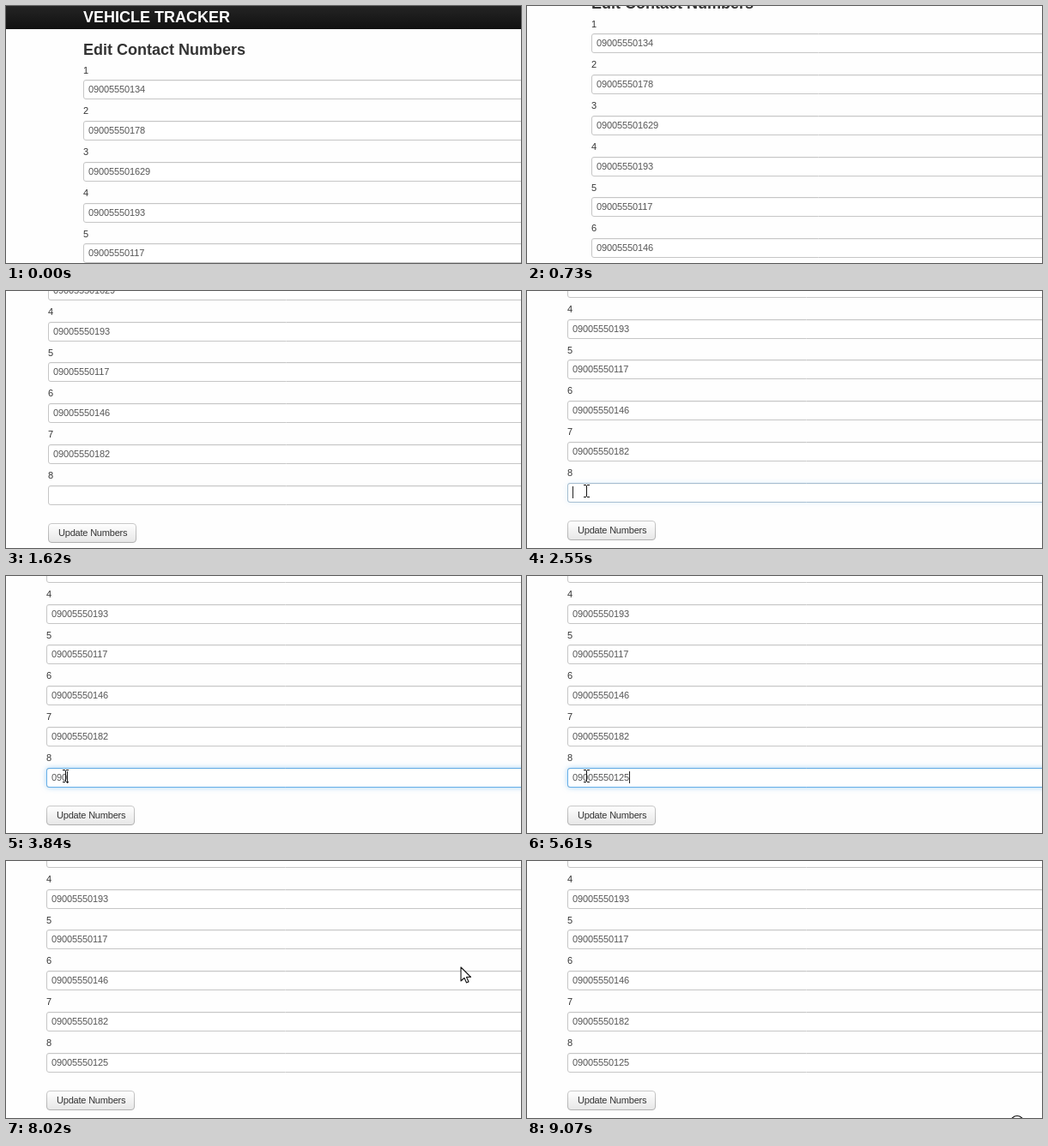
Write an HTML page with a canvas that moves like this. It is 600 by 300 pixels and loops after 9130 ms.

```html
<!DOCTYPE html>
<html lang="en">
<head>
<meta charset="utf-8">
<title>Edit Contact Numbers</title>
<style>
  html, body { margin: 0; width: 100%; height: 100%; overflow: hidden; background: #fefefe; }
  canvas { display: block; }
</style>
</head>
<body>
<canvas id="stage" width="600" height="300"></canvas>
<script>
const ctx = document.getElementById('stage').getContext('2d');
const LOOP = 9130;
const FACE = '"Liberation Sans", Arial, sans-serif';
const SMALL = '11px ' + FACE;
const BOLD = 'bold 18px ' + FACE;

const LEFT = 90;
const numbers = ['09005550134', '09005550178', '090055501629', '09005550193',
                 '09005550117', '09005550146', '09005550182', '09005550125'];
const keyTimes = [3250, 3470, 3840, 3960, 4330, 4450, 4600, 4940, 5120, 5490, 5610];

// time, x, y
const camera = [[454, 0, 0], [730, 15, 54], [1210, 21, 154], [1370, 23, 172],
                [1380, 23, 172], [1620, 41, 194], [1700, 43, 197]];
const pointer = [[1960, 604, 24], [2400, 70, 233], [6310, 70, 233], [6710, 137, 274],
                 [7480, 137, 274], [7860, 530, 124], [8140, 530, 124], [9070, 571, 297]];

const FOCUS = 2460, PRESS = 6950, RELEASE = 7050;

const clamp = v => Math.max(0, Math.min(1, v));
const smooth = v => v * v * (3 - 2 * v);
const snap = (t, from, step) => from + Math.floor((t - from) / step) * step;

function along(keys, t, ease = v => v) {
  const i = keys.findIndex(k => k[0] > t);
  if (i === 0) return keys[0].slice(1);
  if (i < 0) return keys[keys.length - 1].slice(1);
  const [t0, x0, y0] = keys[i - 1], [t1, x1, y1] = keys[i];
  const p = ease((t - t0) / (t1 - t0));
  return [x0 + (x1 - x0) * p, y0 + (y1 - y0) * p];
}

function view(t) {
  if (t < 500) return [0, 0];
  const s = t < 730 ? snap(t, 500, 46)
    : t < 1420 ? Math.min(1370, snap(t, 730, 40))
    : snap(t, 1420, 40);
  return along(camera, s).map(Math.round);
}

function text(str, x, y, font, color, spacing = 0) {
  ctx.font = font;
  ctx.fillStyle = color;
  ctx.letterSpacing = spacing + 'px';
  ctx.fillText(str, x, y);
  ctx.letterSpacing = '0px';
}

function digits(str, x, y) {
  ctx.font = SMALL;
  text(str, x, y, SMALL, '#555', 6 - ctx.measureText('0').width);
}

function box(x, y, w, h, r) {
  ctx.beginPath();
  ctx.roundRect(x + 0.5, y + 0.5, w - 1, h - 1, r);
}

function fade(y, h, top, bottom) {
  const g = ctx.createLinearGradient(0, y, 0, y + h);
  g.addColorStop(0, top);
  g.addColorStop(1, bottom);
  return g;
}

function field(y, value, glow) {
  const w = 700;
  if (glow > 0) {
    ctx.save();
    ctx.shadowColor = `rgba(82,168,236,${0.6 * glow})`;
    ctx.shadowBlur = 6;
    ctx.fillStyle = '#fff';
    box(LEFT, y, w, 23, 2.5);
    ctx.fill();
    ctx.restore();
  }
  box(LEFT, y, w, 23, 2.5);
  ctx.fillStyle = '#fff';
  ctx.fill();
  ctx.fillStyle = 'rgba(0,0,0,.04)';
  ctx.fillRect(LEFT + 2, y + 1, w, 1);
  box(LEFT, y, w, 23, 2.5);
  ctx.lineWidth = 1;
  ctx.strokeStyle = '#c6c6c6';
  ctx.stroke();
  if (glow > 0) {
    ctx.strokeStyle = `rgba(92,172,236,${0.9 * glow})`;
    ctx.stroke();
  }
  digits(value, LEFT + 6, y + 15);
}

function button(hover, pressed) {
  const y = 465;
  box(LEFT, y, 103, 23, 3.5);
  ctx.fillStyle = pressed ? '#dcdcdc' : hover ? fade(y, 23, '#e9e9e9', '#e2e2e2') : fade(y, 23, '#fff', '#e6e6e6');
  ctx.fill();
  ctx.lineWidth = 1;
  ctx.strokeStyle = fade(y, 23, '#c9c9c9', '#b0b0b0');
  ctx.stroke();
  text('Update Numbers', LEFT + 12, 480, SMALL, '#333', -0.2);
}

function page(t, hover) {
  ctx.fillStyle = fade(0, 27, '#242424', '#111');
  ctx.fillRect(0, 0, 700, 27);
  text('VEHICLE TRACKER', LEFT, 19, BOLD, '#fff');
  text('Edit Contact Numbers', LEFT, 57, BOLD, '#333');

  const typed = keyTimes.filter(k => k <= t).length;
  const glow = t < PRESS ? clamp((t - FOCUS) / 270) : 1 - clamp((t - PRESS) / 240);
  numbers.forEach((number, i) => {
    const last = i === numbers.length - 1;
    const y = Math.floor(86.9 + 47.75 * i);
    text(String(i + 1), LEFT, Math.floor(79.2 + 47.75 * i), SMALL, '#333');
    field(y, last ? number.slice(0, typed) : number, last ? glow : 0);
    if (last && t >= FOCUS && t < 6100) {
      ctx.fillStyle = '#222';
      ctx.fillRect(LEFT + 6 + typed * 6, y + 4, 1, 14);
    }
  });
  button(hover, t >= PRESS && t < RELEASE);
}

function shape(points, x, y) {
  ctx.beginPath();
  points.forEach(([px, py]) => ctx.lineTo(x + px, y + py));
  ctx.closePath();
  ctx.fillStyle = '#fff';
  ctx.fill();
  ctx.lineWidth = 1.1;
  ctx.lineJoin = 'round';
  ctx.strokeStyle = '#111';
  ctx.stroke();
}

function arrow(x, y) {
  shape([[0, 0], [0, 16], [4, 12.5], [6.5, 18], [9, 17], [6.5, 11.5], [11.5, 11.5]], x, y);
}

function beam(x, y) {
  ctx.fillStyle = '#111';
  ctx.fillRect(x - 1, y - 6, 1, 13);
  for (const end of [-7, 7]) {
    ctx.fillRect(x - 4, y + end, 3, 1);
    ctx.fillRect(x, y + end, 3, 1);
  }
}

function hand(x, y) {
  ctx.beginPath();
  ctx.moveTo(x - 3, y + 12);
  ctx.lineTo(x - 3, y + 1.5);
  ctx.quadraticCurveTo(x - 1, y - 1.5, x + 1, y + 1.5);
  ctx.lineTo(x + 1, y + 7);
  ctx.quadraticCurveTo(x + 4, y + 5.5, x + 4.5, y + 8);
  ctx.quadraticCurveTo(x + 7.5, y + 6.5, x + 8, y + 9);
  ctx.quadraticCurveTo(x + 11, y + 8.5, x + 11, y + 11);
  ctx.quadraticCurveTo(x + 11, y + 17, x + 8.5, y + 19);
  ctx.lineTo(x + 8.5, y + 23);
  ctx.lineTo(x - 1, y + 23);
  ctx.lineTo(x - 1, y + 20);
  ctx.quadraticCurveTo(x - 4, y + 17, x - 7, y + 12);
  ctx.quadraticCurveTo(x - 5.5, y + 9, x - 3, y + 12);
  ctx.closePath();
  ctx.fillStyle = '#fff';
  ctx.fill();
  ctx.lineWidth = 1.2;
  ctx.strokeStyle = '#111';
  ctx.stroke();
  ctx.beginPath();
  for (const [dx, dy] of [[1, 7], [4.5, 8], [8, 9]]) {
    ctx.moveTo(x + dx, y + dy);
    ctx.lineTo(x + dx, y + dy + 4);
  }
  ctx.stroke();
}

function ring(x, y) {
  ctx.beginPath();
  ctx.arc(x, y + 8, 7.5, 0, Math.PI * 2);
  ctx.lineWidth = 1.2;
  ctx.strokeStyle = '#111';
  ctx.stroke();
}

function draw(t) {
  const [cx, cy] = view(t);
  const [x, y] = along(pointer, t, smooth).map(Math.round);
  const dx = x + cx, dy = y + cy;
  const shown = t >= 2000;
  const hover = shown && dx >= LEFT && dx < LEFT + 103 && dy >= 465 && dy < 488;

  ctx.fillStyle = '#fefefe';
  ctx.fillRect(0, 0, 600, 300);
  ctx.save();
  ctx.translate(-cx, -cy);
  page(t, hover);
  ctx.restore();

  if (!shown) return;
  if (t >= 9030) ring(x, y);
  else if (hover) hand(x, y);
  else if (t < 6700 && dy >= 421 && dy < 444) beam(x, y);
  else arrow(x, y);
}

const start = performance.now();
function tick() {
  draw((performance.now() - start) % LOOP);
  requestAnimationFrame(tick);
}
tick();
</script>
</body>
</html>
```
